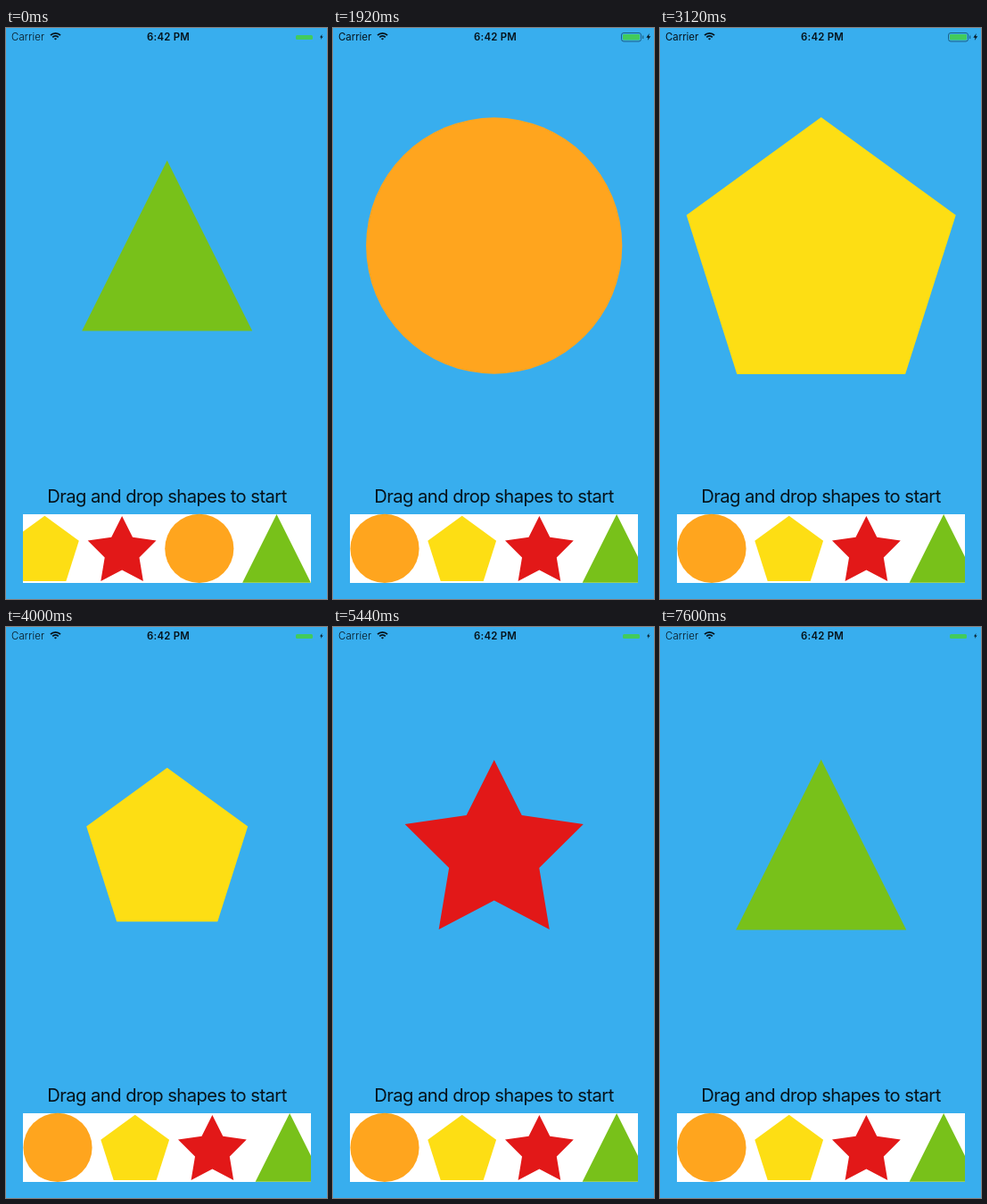
An HTML page with a canvas that plays this animation: 360 by 640 pixels, repeating every 7.68 s.

```html
<!DOCTYPE html>
<html lang="en">
<head>
<meta charset="utf-8">
<title>Shapes</title>
<style>
  html, body { margin: 0; width: 100%; height: 100%; overflow: hidden; background: #38aeee; }
  canvas { display: block; width: 360px; height: 640px; }
</style>
</head>
<body>
<canvas width="360" height="640"></canvas>
<script>
const ctx = document.querySelector('canvas').getContext('2d');
const LOOP = 7680, STEP = 80;
const FONT = 'Inter, "Open Sans", sans-serif';

// Right half of each outline, top to bottom, in units of half a tile.
const shapes = {
  circle: { color: '#ffa51e' },
  pentagon: { color: '#fdde14', half: [[0, -.953], [1, -.227], [.625, .953]] },
  star: { color: '#e21818', half: [[0, -.95], [.31, -.33], [1, -.23], [.505, .26], [.62, .95], [0, .625]] },
  triangle: { color: '#78c11a', half: [[0, -1], [1, 1]] },
};
// Moment at which each shape starts to grow; it appears a little earlier.
const shows = [['circle', 1225], ['pentagon', 2840], ['star', 4475], ['triangle', 6070]];
const APPEAR = 200, SHRINK = 800;

const clamp = x => Math.max(0, Math.min(1, x));
const ease = (t, from, to) => {
  const p = clamp((t - from) / (to - from));
  return p * p * (3 - 2 * p);
};

// Damped spring from 0 to 1, damping ratio 0.5.
function spring(ms) {
  if (ms <= 0) return 0;
  const a = ms * .01122;
  return 1 - Math.exp(-ms * .00648) * (Math.cos(a) + .577 * Math.sin(a));
}

function drawShape(name, x, y, r) {
  const { color, half } = shapes[name];
  ctx.fillStyle = color;
  ctx.beginPath();
  if (half) {
    for (const [px, py] of half) ctx.lineTo(x + px * r, y + py * r);
    for (const [px, py] of [...half].reverse()) ctx.lineTo(x - px * r, y + py * r);
  } else {
    ctx.arc(x, y, r * 1.005, 0, 7);
  }
  ctx.fill();
}

function text(str, x, y, size, weight, spacing, align = 'center') {
  ctx.font = `${weight} ${size}px ${FONT}`;
  ctx.letterSpacing = spacing + 'px';
  ctx.textAlign = align;
  ctx.fillText(str, x, y);
}

function roundBox(x, y, w, h, r) {
  ctx.beginPath();
  ctx.roundRect(x, y, w, h, r);
}

function drawStatus(strong) {
  ctx.fillStyle = ctx.strokeStyle = '#06121a';
  text('Carrier', 6, 14, 11.4, strong ? 400 : 300, strong ? 0 : .15, 'left');
  text('6:42 PM', 182, 14, 11.4, 600, .25);

  ctx.lineWidth = 1.8;
  for (const r of [1.3, 4.6, 7.8]) {
    ctx.beginPath();
    ctx.arc(55.5, 13.6, r, -Math.PI * .75, -Math.PI * .25);
    ctx.stroke();
  }

  const s = strong ? 1 : .75;
  ctx.beginPath();
  for (const [x, y] of [[1, -4], [-2.4, .8], [-.2, .8], [-1, 4], [2.4, -.8], [.2, -.8]])
    ctx.lineTo(353.8 + x * s, 10 + y * s);
  ctx.fill();

  if (strong) {
    ctx.strokeStyle = '#1c6187';
    ctx.lineWidth = 1;
    roundBox(323.5, 5.5, 22, 9.5, 2.5);
    ctx.stroke();
    ctx.fillStyle = '#1c6187';
    ctx.fillRect(347, 8.5, 1.2, 3.5);
  }
  ctx.fillStyle = '#42cb5c';
  if (strong) roundBox(325, 7, 19, 6.5, 1);
  else roundBox(325, 8, 19, 5, 1.5);
  ctx.fill();
}

function drawStrip(t) {
  const y = 583.4, r = 38.4, pitch = 86.7;
  const scroll = 14.6 * (1 - ease(t, 420, 860));
  const slot = i => 58 + pitch * i - scroll;

  ctx.save();
  ctx.beginPath();
  ctx.rect(19, 545, 323, 77);
  ctx.fillStyle = '#fff';
  ctx.fill();
  ctx.clip();
  drawShape('pentagon', slot(ease(t, 600, 840)), y, r);
  drawShape('star', slot(1 + ease(t, 400, 640)), y, r);
  drawShape('triangle', slot(3), y, r);
  ctx.restore();

  // The circle is lifted and carried to the front of the row.
  const lift = 9 * (ease(t, 200, 360) - ease(t, 780, 940));
  const x = slot(2 - 2 * ease(t, 240, 860));
  if (lift > 0) {
    ctx.fillStyle = '#fff';
    ctx.fillRect(x - r, y - r - lift, 2 * r, 2 * r);
  }
  drawShape('circle', x, y - lift, r);
}

function draw(t) {
  let name = 'triangle', scale = 1;
  for (const [shape, start] of shows) {
    if (t < start - APPEAR) break;
    name = shape;
    scale = 1 + .5 * (spring(t - start) - spring(t - start - SHRINK));
  }
  ctx.fillStyle = '#38aeee';
  ctx.fillRect(0, 0, 360, 640);
  drawStatus(scale > 1.25);
  drawShape(name, 180.7, 244, 95.5 * scale);
  ctx.fillStyle = '#06121a';
  text('Drag and drop shapes to start', 180.5, 532, 20.2, 400, -.55);
  drawStrip(t);
}

const begin = performance.now();
function tick() {
  const t = (performance.now() - begin) % LOOP;
  draw(Math.floor(t / STEP) * STEP);
  requestAnimationFrame(tick);
}
tick();
</script>
</body>
</html>
```
